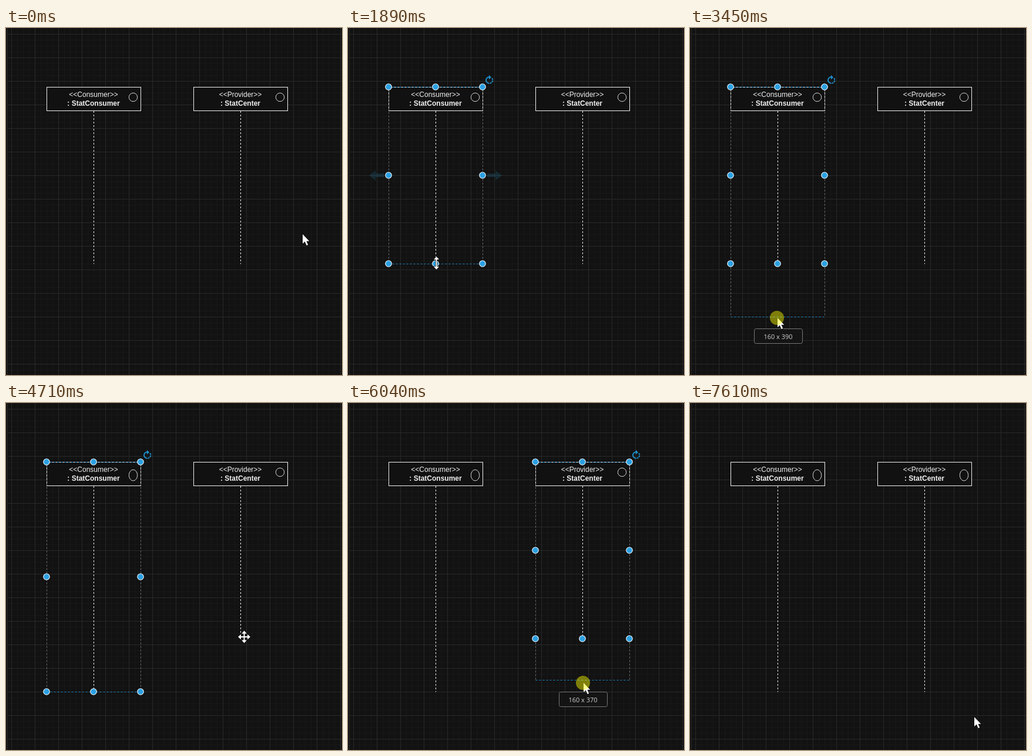
An HTML page with a canvas for the animation above (8470 ms loop, 572 by 589 pixels).

```html
<!DOCTYPE html>
<html lang="en">
<head>
<meta charset="utf-8">
<title>Resizing lifelines</title>
<style>
  html, body { margin: 0; width: 100%; height: 100%; overflow: hidden; background: #121212; }
  canvas { display: block; }
</style>
</head>
<body>
<canvas id="stage" width="572" height="589"></canvas>
<script>
const canvas = document.getElementById('stage');
const ctx = canvas.getContext('2d');
const LOOP = 8470;
const BG = '#121212';
const BLUE = '#2ba0e2';
const SANS = '"Liberation Sans", Arial, sans-serif';

const lifelines = [
  { x: 69, kind: '<<Consumer>>', name: ': StatConsumer',
    selectAt: 1570, dragAt: 2350, dropAt: 3840, deselectAt: 4940 },
  { x: 319, kind: '<<Provider>>', name: ': StatCenter',
    selectAt: 4940, dragAt: 5490, dropAt: 6680, deselectAt: 7610 }
];
const hints = { from: 1570, to: 2350 };

const linear = u => u;
const smooth = u => (1 - Math.cos(Math.PI * u)) / 2;

// Pointer moves: first and last change, number of steps, destination
const start = { x: 505, y: 350 };
const moves = [
  { t0: 70, t1: 860, n: 11, x: 159, y: 376, ease: smooth, bow: 27 },
  { t0: 940, t1: 1100, n: 3, x: 144, y: 389 },
  { t0: 1340, t1: 1340, n: 1, x: 149, y: 391 },
  { t0: 1570, t1: 2040, n: 7, x: 150, y: 402 },
  { t0: 2350, t1: 2750, n: 6, x: 156, y: 468 },
  { t0: 2980, t1: 3060, n: 2, x: 152, y: 481 },
  { t0: 3290, t1: 3450, n: 3, x: 149, y: 492 },
  { t0: 3920, t1: 4240, n: 5, x: 419, y: 391, ease: smooth },
  { t0: 4470, t1: 4470, n: 1, x: 410, y: 398 },
  { t0: 4630, t1: 4710, n: 2, x: 405, y: 397 },
  { t0: 5100, t1: 5180, n: 2, x: 405, y: 401 },
  { t0: 5330, t1: 5330, n: 1, x: 405, y: 402 },
  { t0: 5490, t1: 6280, n: 11, x: 400.5, y: 490, ease: smooth },
  { t0: 6830, t1: 7310, n: 7, x: 484, y: 533, ease: smooth }
];

const shapes = [
  [0, 'arrow'], [1340, 'move'], [1800, 'resize'], [2350, 'arrow'],
  [3840, 'resize'], [3920, 'arrow'], [4470, 'move'], [4940, 'resize'],
  [5490, 'arrow'], [6680, 'resize'], [6830, 'arrow']
];
const presses = [[1420, 1570], [2350, 3840], [4870, 4940], [5490, 6680], [7460, 7610]];

const between = (t, a, b) => t >= a && t < b;

function pointerAt(t) {
  let p = start;
  for (const m of moves) {
    if (t < m.t0) break;
    const gap = m.n > 1 ? (m.t1 - m.t0) / (m.n - 1) : 1;
    const step = Math.min(m.n, Math.floor((t - m.t0 + 3) / gap) + 1);
    const u = (m.ease || linear)(step / m.n);
    p = {
      x: p.x + (m.x - p.x) * u,
      y: p.y + (m.y - p.y) * u + (m.bow || 0) * 4 * u * (1 - u)
    };
  }
  return { x: Math.round(p.x), y: Math.round(p.y) };
}

function line(x1, y1, x2, y2, color, dash = []) {
  ctx.strokeStyle = color;
  ctx.lineWidth = 1;
  ctx.setLineDash(dash);
  ctx.beginPath();
  ctx.moveTo(x1, y1);
  ctx.lineTo(x2, y2);
  ctx.stroke();
  ctx.setLineDash([]);
}

function disc(x, y, r, fill) {
  ctx.beginPath();
  ctx.arc(x, y, r, 0, Math.PI * 2);
  ctx.fillStyle = fill;
  ctx.fill();
}

function text(str, x, y, font, color) {
  ctx.font = font;
  ctx.fillStyle = color;
  ctx.textAlign = 'center';
  ctx.fillText(str, x, y);
}

function drawGrid() {
  ctx.fillStyle = BG;
  ctx.fillRect(0, 0, 572, 589);
  for (const [gap, color] of [[10, '#181818'], [40, '#292929']]) {
    for (let x = 9.5; x < 572; x += gap) line(x, 0, x, 589, color);
    for (let y = 10.5; y < 589; y += gap) line(2, y, 572, y, color);
  }
  line(2.5, 0, 2.5, 589, '#292929');
}

function drawLifeline(l, height) {
  const mid = l.x + 80.5;
  const scale = height / 300;
  line(mid, 141, mid, 100.5 + height, '#f2f2f2', [3, 3]);
  ctx.fillStyle = '#111';
  ctx.fillRect(l.x, 100, 161, 41);
  ctx.strokeStyle = '#f0f0f0';
  ctx.strokeRect(l.x + 0.5, 100.5, 160, 40);
  text(l.kind, mid - 0.5, 117, '12px ' + SANS, '#f0f0f0');
  text(l.name, mid - 0.5, 132, 'bold 12px ' + SANS, '#f0f0f0');
  ctx.strokeStyle = '#d8d8d8';
  ctx.beginPath();
  ctx.ellipse(l.x + 147.5, 100.5 + 17 * scale, 7.2, 7.2 * scale, 0, 0, Math.PI * 2);
  ctx.stroke();
}

function drawOutline(l, height) {
  const left = l.x + 0.5, right = left + 160, bottom = 100.5 + height;
  line(left, 100.5, left, bottom, '#707070', [3, 3]);
  line(right, 100.5, right, bottom, '#707070', [3, 3]);
  line(left, 100.5, right, 100.5, '#1a8bd0', [3, 3]);
  line(left, bottom, right, bottom, '#1a86c8', [3, 3]);
}

const rotateIcon = new Path2D(
  'M15.5 5.5L11 1V4A8 8 0 0 0 11 20V18A6 6 0 0 1 11 6V10Z' +
  'M20 11A8 8 0 0 0 18.3 7.1L16.9 8.5A6 6 0 0 1 17.9 11Z' +
  'M13 17.9V19.9A8 8 0 0 0 16.9 18.3L15.5 16.9A6 6 0 0 1 13 17.9Z' +
  'M16.9 15.5L18.3 16.9A8 8 0 0 0 20 13H17.9A6 6 0 0 1 16.9 15.5Z');

function drawHandles(l, height) {
  for (const dx of [0, 80, 160]) {
    for (const part of [0, 0.5, 1]) {
      if (dx === 80 && part === 0.5) continue;
      const x = l.x + dx, y = 100 + height * part;
      disc(x, y, 5.8, '#f4f8fb');
      disc(x, y, 4.7, BLUE);
    }
  }
  ctx.save();
  ctx.translate(l.x + 163, 79.5);
  ctx.scale(0.75, 0.75);
  ctx.fillStyle = ctx.strokeStyle = '#2196d6';
  ctx.lineWidth = 0.6;
  ctx.fill(rotateIcon);
  ctx.stroke(rotateIcon);
  ctx.restore();
}

const hintArrow = new Path2D('M1 9L12 1V6H26V12H12V18Z');

function drawHints(l, height) {
  for (const side of [-1, 1]) {
    ctx.save();
    ctx.globalAlpha = 0.15;
    ctx.translate(l.x + 80 + side * 114, 91 + height / 2);
    ctx.scale(-side, 1);
    ctx.fillStyle = '#29b6f2';
    ctx.fill(hintArrow);
    ctx.restore();
  }
}

function drawSize(l, height) {
  const x = l.x + 40.5, y = 120.5 + height;
  ctx.beginPath();
  ctx.roundRect(x, y, 82, 25, 3);
  ctx.fillStyle = '#141414';
  ctx.fill();
  ctx.strokeStyle = '#777';
  ctx.lineWidth = 1;
  ctx.stroke();
  text('160 x ' + height, l.x + 81, y + 17.5, '11px "Open Sans", sans-serif', '#d0d0d0');
}

const arrowHeads = (r, angles) => angles.map(a => {
  const c = Math.round(Math.cos(a)), s = Math.round(Math.sin(a));
  const at = (d, w) => `${c * d - s * w} ${s * d + c * w}`;
  return `M${at(r, 0)}L${at(r - 5, 4.5)}L${at(r - 5, 1)}L${at(0, 1)}` +
    `L${at(0, -1)}L${at(r - 5, -1)}L${at(r - 5, -4.5)}Z`;
}).join('');

const quarter = Math.PI / 2;
const cursors = {
  arrow: new Path2D('M0 0V16L3.8 12.6L6.6 19L9.2 17.9L6.5 11.7H11.3Z'),
  move: new Path2D(arrowHeads(10.5, [0, quarter, 2 * quarter, 3 * quarter])),
  resize: new Path2D(arrowHeads(11, [quarter, -quarter]))
};

function drawCursor(name, p) {
  const path = cursors[name];
  ctx.save();
  ctx.translate(p.x + (name === 'arrow' ? 0 : 0.5), p.y);
  ctx.strokeStyle = '#0a0a0a';
  ctx.lineWidth = 1.4;
  ctx.stroke(path);
  ctx.fillStyle = '#fff';
  ctx.fill(path);
  ctx.restore();
}

function draw(t) {
  const p = pointerAt(t);
  drawGrid();
  for (const l of lifelines) {
    const height = t >= l.dropAt ? 390 : 300;
    const dragging = between(t, l.dragAt, l.dropAt);
    const dragHeight = Math.round((p.y - 102) / 10) * 10;
    drawLifeline(l, height);
    if (!between(t, l.selectAt, l.deselectAt)) continue;
    drawOutline(l, dragging ? dragHeight : height);
    if (between(t, hints.from, hints.to)) drawHints(l, height);
    drawHandles(l, height);
    if (dragging) drawSize(l, dragHeight);
  }
  drawCursor(shapes.filter(s => t >= s[0]).pop()[1], p);
  if (presses.some(([a, b]) => between(t, a, b))) {
    disc(p.x - 1, p.y, 12, 'rgba(255, 255, 0, 0.46)');
  }
}

const begin = performance.now();
function tick() {
  draw((performance.now() - begin) % LOOP);
  requestAnimationFrame(tick);
}
tick();
</script>
</body>
</html>
```
